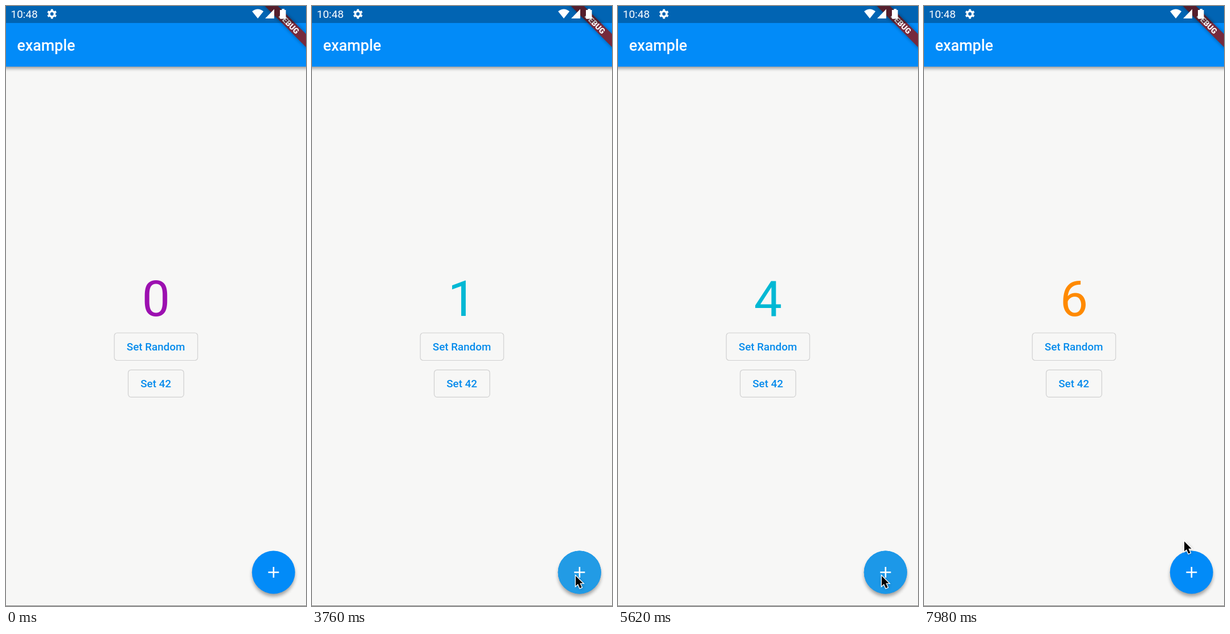
Animation, 529 px wide and 1059 px high, one loop 8 s. Source, as an HTML page:

```html
<!DOCTYPE html>
<html lang="en">
<head>
<meta charset="utf-8">
<title>Counter example</title>
<style>
  html, body { margin: 0; width: 100%; height: 100%; overflow: hidden; background: #f7f7f6; }
  svg { display: block; }
  text { font-family: Roboto, sans-serif; }
  .button text { font-size: 18.86px; font-weight: 500; fill: #058bec; text-anchor: middle; }
  .button rect { fill: none; stroke: #d0d0d0; stroke-width: 1.2; }
</style>
</head>
<body>
<svg width="529" height="1059" viewBox="0 0 529 1059">
  <defs>
    <filter id="soft" x="-50%" y="-50%" width="200%" height="200%"><feGaussianBlur stdDeviation="3"/></filter>
    <filter id="bannerBlur" x="-100" y="-50" width="200" height="100" filterUnits="userSpaceOnUse"><feGaussianBlur stdDeviation="3"/></filter>
    <clipPath id="fabClip"><circle cx="471.7" cy="999.5" r="38"/></clipPath>
  </defs>

  <rect width="529" height="1059" fill="#f7f7f6"/>

  <!-- App bar -->
  <rect x="-20" y="60" width="569" height="50" opacity=".4" filter="url(#soft)"/>
  <rect width="529" height="107" fill="#028bf8"/>
  <text x="19.5" y="78.7" font-size="26.94" font-weight="500" fill="#fff">example</text>

  <!-- Corner banner -->
  <g transform="translate(499 31) rotate(45)">
    <rect x="-60" y="-8.1" width="120" height="16.2" opacity=".4" filter="url(#bannerBlur)"/>
    <rect x="-60" y="-8.1" width="120" height="16.2" fill="#762a3d"/>
    <text y="4.9" font-size="13.8" font-weight="900" fill="#fff" text-anchor="middle">DEBUG</text>
  </g>

  <!-- Status bar -->
  <rect width="529" height="30" opacity=".28"/>
  <g fill="#fff">
    <text x="8.5" y="21" font-size="19">10:48</text>
    <path d="M444 22L434 9.5Q444 1.5 454 9.5ZM457 22L473 5.5V22ZM484 7h2.5V5h4.5V7h2.5V22.5H483V7Z"/>
    <g fill="none" stroke="#fff">
      <circle cx="81" cy="14" r="4.7" stroke-width="3.6"/>
      <circle cx="81" cy="14" r="7" stroke-width="3" pathLength="6" stroke-dasharray=".5" stroke-dashoffset="-.25"/>
    </g>
  </g>

  <!-- Counter and buttons -->
  <text id="count" x="264.5" y="546.6" font-size="88" text-anchor="middle">0</text>
  <g class="button">
    <rect x="191" y="577" width="147" height="48.5" rx="5"/>
    <text x="264.2" y="608">Set Random</text>
    <rect x="215.5" y="642.3" width="98" height="48" rx="5"/>
    <text x="264.2" y="673">Set 42</text>
  </g>

  <!-- Floating button -->
  <circle cx="471.7" cy="1004.5" r="37.5" opacity=".36" filter="url(#soft)"/>
  <circle cx="471.7" cy="999.5" r="38" fill="#028bf8"/>
  <g clip-path="url(#fabClip)"><circle id="ripple" cx="465" cy="1006" fill="#229be5"/></g>
  <path d="M462.3 999.5h19M471.8 990v19" stroke="#fff" stroke-width="2.6"/>

  <rect y="1058" width="529" height="1" fill="#858585"/>
  <g id="cursor">
    <path d="M1 2V20l4-4 3.5 8 3.5-1.5-3.5-7.5h6Z" opacity=".3" filter="url(#soft)"/>
    <path d="M0 0V17.5l4-3.6 3.4 7.6 3.2-1.4-3.3-7.4h5.3Z" stroke="#fff" stroke-width="2.6" paint-order="stroke"/>
  </g>
</svg>
<script>
const LOOP = 8000, FIRST_TAP = 3600, TAP_GAP = 600, TAPS = 6, PRESS = 120;
const [count, ripple, cursor] = ["count", "ripple", "cursor"].map(id => document.getElementById(id));

// Pointer stops: time, x, y
const path = [
  [920, 430, 1062], [1240, 440, 1028], [1640, 465, 1006],
  [7300, 465, 1006], [7980, 459, 945]
];

const clamp = v => Math.min(1, Math.max(0, v));
const ease = v => v * v * (3 - 2 * v);

function pointerAt(t) {
  const next = path.findIndex(stop => stop[0] > t);
  if (next < 1) return path.at(next).slice(1);
  const [t0, x0, y0] = path[next - 1], [t1, x1, y1] = path[next];
  const k = ease((t - t0) / (t1 - t0));
  return [x0 + (x1 - x0) * k, y0 + (y1 - y0) * k];
}

function colorAt(t) {
  return t < 1050 ? "#9c10b0" : t < 6700 ? "#00b8d4" : "#ff8a00";
}

function draw(t) {
  const taps = Math.min(TAPS, Math.max(0, Math.floor((t - FIRST_TAP) / TAP_GAP) + 1));
  count.textContent = taps;
  count.setAttribute("fill", colorAt(t));

  // Each ripple starts on press, shortly before the count goes up
  const press = Math.min(TAPS - 1, Math.floor((t - FIRST_TAP + PRESS) / TAP_GAP));
  const age = t - FIRST_TAP + PRESS - press * TAP_GAP;
  ripple.setAttribute("r", 10 + 40 * clamp(age / 220));
  ripple.setAttribute("opacity", press < 0 ? 0 : clamp(age / 80) * clamp((570 - age) / 270));

  cursor.setAttribute("transform", `translate(${pointerAt(t)})`);
}

function tick() {
  draw(performance.now() % LOOP);
  requestAnimationFrame(tick);
}
tick();
</script>
</body>
</html>
```
